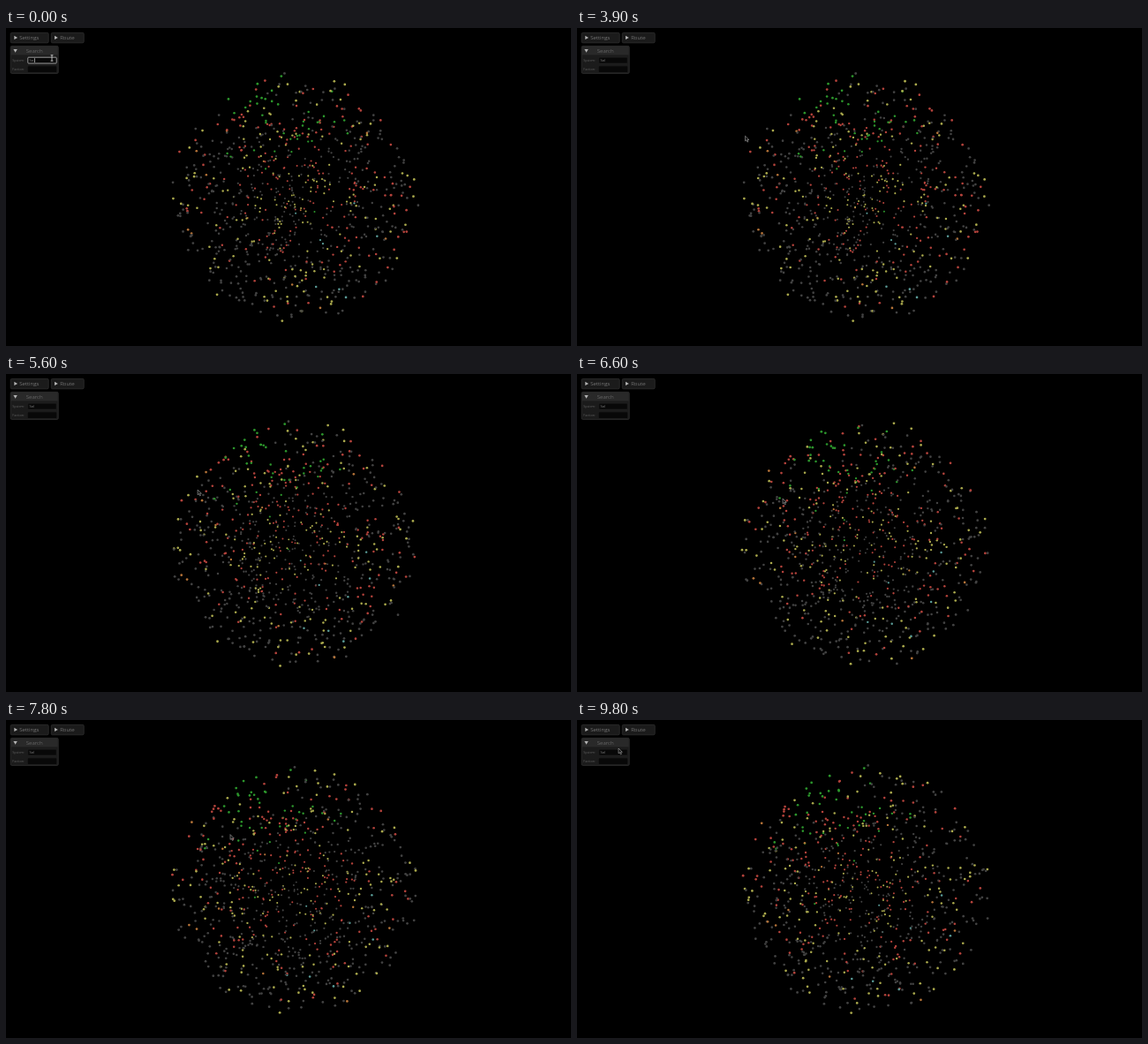
Animation, 640 px wide and 360 px high, one loop 10000 ms. Source, as an HTML page with a canvas:

```html
<!DOCTYPE html>
<html lang="en">
<head>
<meta charset="utf-8">
<title>Star map</title>
<style>
  html, body { margin: 0; width: 100%; height: 100%; overflow: hidden; background: #000; }
  canvas, svg { position: absolute; left: 0; top: 0; width: 640px; height: 360px; }
  text { font-family: "Open Sans", "Noto Sans", sans-serif; font-weight: 300; font-size: 6.2px; fill: #a4a4a4; }
  .small { font-size: 4px; fill: #808080; }
  .box { fill: #1b1b1b; stroke: #303030; stroke-width: .8; }
  .field { fill: #080808; }
  .tri { fill: #b4b4b4; }
</style>
</head>
<body>
<canvas id="sky" width="640" height="360"></canvas>
<svg viewBox="0 0 640 360">
  <rect class="box" x="5.2" y="5.4" width="43" height="11.4" rx="1.4"/>
  <path class="tri" d="M9.3 8.7l3.8 2.2l-3.8 2.2z"/>
  <text x="15.2" y="12.9">Settings</text>
  <rect class="box" x="51.2" y="5.4" width="37" height="11.4" rx="1.4"/>
  <path class="tri" d="M55 8.7l3.8 2.2l-3.8 2.2z"/>
  <text x="61.2" y="12.9">Route</text>

  <rect class="box" x="5.2" y="20.4" width="54" height="31" rx="1.4"/>
  <path d="M5.6 30.5V21.8q0-1 1-1h51.2q1 0 1 1v8.7z" fill="#292929"/>
  <path class="tri" d="M8.4 24h4.4l-2.2 3.8z"/>
  <text x="32.2" y="27.9" text-anchor="middle" style="fill:#858585">Search</text>
  <text class="small" x="7.2" y="38">System:</text>
  <rect id="system" class="field" x="24.8" y="33.2" width="32.4" height="6.8" rx=".8"/>
  <text id="query" class="small" x="26.6" y="38" style="fill:#ccc"></text>
  <path id="caret" d="M32.4 34.2v4.8" stroke="#ddd" stroke-width=".7"/>
  <text class="small" x="7.2" y="48">Faction:</text>
  <rect class="field" x="24.8" y="43.2" width="32.4" height="6.8" rx=".8"/>

  <path id="arrow" d="M0 0v5.8l1.4-1.2l1 2.3l1-.4l-1-2.2h1.9z" fill="#111" stroke="#a8a8a8" stroke-width=".6"/>
  <path id="beam" d="M-1.4-3.2h2.8M0-3.2v6.4M-1.4 3.2h2.8" fill="none" stroke="#ddd" stroke-width=".8"/>
</svg>
<script>
const LOOP = 10000, STEP = 100;
const CX = 327.5, CY = 192, R = 142, COUNT = 880;
const TURN = 0.011;            // radians per dragged pixel
const DRAG = [3800, 8600];
const COLORS = {
  green: '#2c962c', yellow: '#aaa94c', red: '#b3423b',
  cyan: '#5a9c98', orange: '#b57338', gray: '#424242'
};
// time, pointer x, pointer y
const PATH = [
  [100, 52, 34], [700, 102, 58], [1800, 102, 58], [2100, 215, 108], [2400, 165, 94],
  [3500, 189, 122], [3800, 189, 122], [4900, 206, 124], [6600, 233, 141],
  [8600, 268, 122], [9300, 84, 57], [9800, 47, 32]
];

let seed = 4711;
function rnd() {
  seed = (seed + 0x6D2B79F5) | 0;
  let n = Math.imul(seed ^ (seed >>> 15), 1 | seed);
  n = (n + Math.imul(n ^ (n >>> 7), 61 | n)) ^ n;
  return ((n ^ (n >>> 14)) >>> 0) / 4294967296;
}

// 1 at the hub, fading with distance
const near = (p, hub, width) =>
  Math.exp(-p.reduce((sum, v, i) => sum + (v - hub[i]) ** 2, 0) / width ** 2);

// each faction holds a region of the ball; unclaimed stars stay gray
function pickColor(p) {
  const odds = {
    green: 0.65 * near(p, [-0.1, -0.85, -0.3], 0.45),
    red: 0.1 + 0.5 * near(p, [0.15, -0.25, -0.3], 0.65),
    yellow: 0.2,
    cyan: 0.2 * near(p, [0.3, 0.4, 0.1], 0.35),
    orange: 0.02
  };
  let u = rnd();
  for (const name in odds) if ((u -= odds[name]) < 0) return name;
  return 'gray';
}

const stars = Array.from({ length: COUNT }, () => {
  const r = rnd() ** 0.37, h = rnd() * 2 - 1, a = rnd() * Math.PI * 2;
  const w = Math.sqrt(1 - h * h);
  const p = [r * w * Math.cos(a), r * h, r * w * Math.sin(a)];
  return { x: p[0] * R, y: p[1] * R, z: p[2] * R, color: COLORS[pickColor(p)] };
});

const $ = id => document.getElementById(id);
const ctx = $('sky').getContext('2d');
const clamp = (v, lo, hi) => Math.min(hi, Math.max(lo, v));

function pointer(time) {
  const t = clamp(time, PATH[0][0], PATH[PATH.length - 1][0]);
  const i = Math.max(1, PATH.findIndex(p => p[0] >= t));
  const [t0, x0, y0] = PATH[i - 1], [t1, x1, y1] = PATH[i];
  const k = (t - t0) / (t1 - t0);
  return [x0 + (x1 - x0) * k, y0 + (y1 - y0) * k];
}

function drawSky(t) {
  const [ax, ay] = pointer(DRAG[0]);
  const [bx, by] = pointer(clamp(t, ...DRAG));
  const yaw = (bx - ax) * TURN, pitch = (by - ay) * TURN;
  const cy = Math.cos(yaw), sy = Math.sin(yaw), cp = Math.cos(pitch), sp = Math.sin(pitch);
  ctx.clearRect(0, 0, 640, 360);
  const seen = stars.map(s => {
    const z = s.z * cy - s.x * sy;
    return { x: s.x * cy + s.z * sy, y: s.y * cp + z * sp, z: z * cp - s.y * sp, color: s.color };
  }).sort((a, b) => a.z - b.z);
  for (const s of seen) {
    const size = 0.95 + 0.45 * Math.min(1, Math.hypot(s.x, s.y) / R);
    ctx.fillStyle = s.color;
    ctx.beginPath();
    ctx.arc(CX + s.x, CY + s.y, size, 0, Math.PI * 2);
    ctx.fill();
  }
}

function drawPanel(t) {
  const focus = t < 1900, typing = t < 200;
  $('query').textContent = typing ? 'So' : 'Sol';
  $('system').style.stroke = focus ? '#bbb' : '#2c2c2c';
  $('system').style.strokeWidth = focus ? 0.8 : 0.4;
  $('caret').style.display = focus && (t < 1000 || t >= 1400) ? '' : 'none';
  $('caret').setAttribute('transform', `translate(${typing ? 0 : 0.8} 0)`);
  const [x, y] = pointer(t);
  $('beam').style.display = typing ? '' : 'none';
  $('arrow').style.display = typing ? 'none' : '';
  $(typing ? 'beam' : 'arrow').setAttribute('transform', `translate(${x} ${y})`);
}

let last = -1;
const start = performance.now();
function tick() {
  const t = Math.floor(((performance.now() - start) % LOOP) / STEP) * STEP;
  if (t !== last) {
    last = t;
    drawSky(t);
    drawPanel(t);
  }
  requestAnimationFrame(tick);
}
tick();
</script>
</body>
</html>
```
